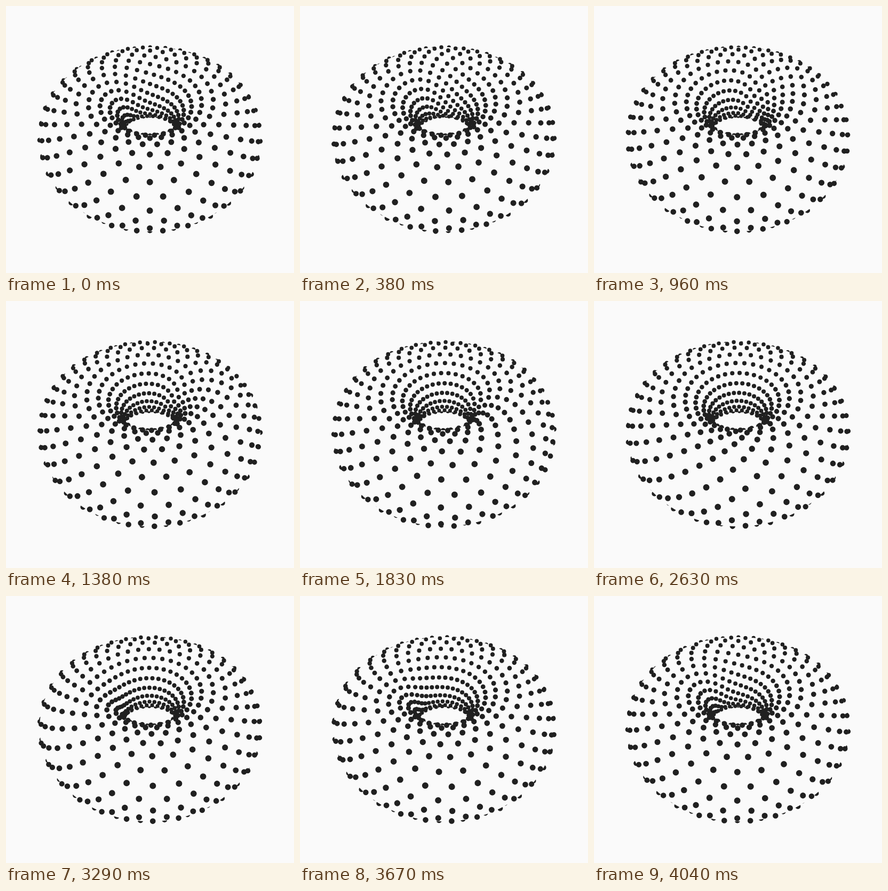
Animation of 540 by 500 pixels, one loop 4.08 s. Source, as an HTML page with a canvas:

```html
<!DOCTYPE html>
<html lang="en">
<head>
<meta charset="utf-8">
<title>Dotted torus</title>
<style>
  html, body { margin: 0; width: 100%; height: 100%; overflow: hidden; background: #fafafa; }
  canvas { display: block; }
</style>
</head>
<body>
<canvas id="stage" width="540" height="500"></canvas>
<script>
const ctx = document.getElementById('stage').getContext('2d');
const TAU = Math.PI * 2, DEG = TAU / 360;
const LOOP = 4080;
const PAPER = '#fafafa', INK = '#202020';

// Torus of ring radius 1, tilted and lifted a little above the optical axis
const TUBE = 0.595, DOT = 0.0335;
const DIST = 3.85, FOCAL = 472, LIFT = 0.235, CX = 270, CY = 250;
const SIN = 0.775, COS = Math.sqrt(1 - SIN * SIN);
const EYE = { up: DIST * SIN - LIFT * COS, near: DIST * COS + LIFT * SIN };

const COLUMNS = 64, PER_COLUMN = 12;
const STEP = TAU / COLUMNS, GAP = TAU / PER_COLUMN;

function project(theta, phi) {
  const rho = 1 + TUBE * Math.cos(phi), h = TUBE * Math.sin(phi);
  const z = rho * Math.cos(theta);
  const scale = FOCAL / (DIST - h * SIN - z * COS);
  return {
    x: CX + rho * Math.sin(theta) * scale,
    y: CY + (z * SIN - h * COS - LIFT) * scale,
    r: DOT * scale
  };
}

// A point of the tube faces the eye when a*cos(phi) + b*sin(phi) > TUBE
const facing = theta => ({ a: EYE.near * Math.cos(theta) - 1, b: EYE.up });

function addContour(path, side) {
  for (let i = 0; i < 240; i++) {
    const theta = i / 240 * TAU;
    const { a, b } = facing(theta);
    const phi = Math.atan2(b, a) + side * Math.acos(TUBE / Math.hypot(a, b));
    const p = project(theta, phi);
    if (i) path.lineTo(p.x, p.y); else path.moveTo(p.x, p.y);
  }
  path.closePath();
}

// Everything the solid body does not cover
const outside = new Path2D();
outside.rect(0, 0, 540, 500);
addContour(outside, -1);
addContour(outside, 1);

// The tube turns by two gaps, in a soft step that travels round the ring
function twist(theta, t) {
  const p = (theta - 40 * DEG) / TAU + t;
  const d = p - Math.floor(p) - 0.5;
  return -GAP * (1 + Math.tanh(9.65 * d));
}

function addDot(path, p) {
  path.moveTo(p.x + p.r, p.y);
  path.arc(p.x, p.y, p.r, 0, TAU);
}

function draw(t) {
  const front = new Path2D(), behind = new Path2D();
  for (let c = 0; c < COLUMNS; c++) {
    const theta = (c + 4 * t) * STEP - 0.08 * DEG;
    const { a, b } = facing(theta);
    const start = twist(theta, t) + (c % 2) * GAP / 2;
    for (let k = 0; k < PER_COLUMN; k++) {
      const phi = start + k * GAP;
      const seen = a * Math.cos(phi) + b * Math.sin(phi) > TUBE;
      addDot(seen ? front : behind, project(theta, phi));
    }
  }
  ctx.fillStyle = PAPER;
  ctx.fillRect(0, 0, 540, 500);
  ctx.fillStyle = INK;
  ctx.save();
  ctx.clip(outside, 'evenodd');
  ctx.fill(behind);
  ctx.restore();
  ctx.fill(front);
}

const begin = performance.now();
function frame() {
  draw((performance.now() - begin) % LOOP / LOOP);
  requestAnimationFrame(frame);
}
frame();
</script>
</body>
</html>
```
